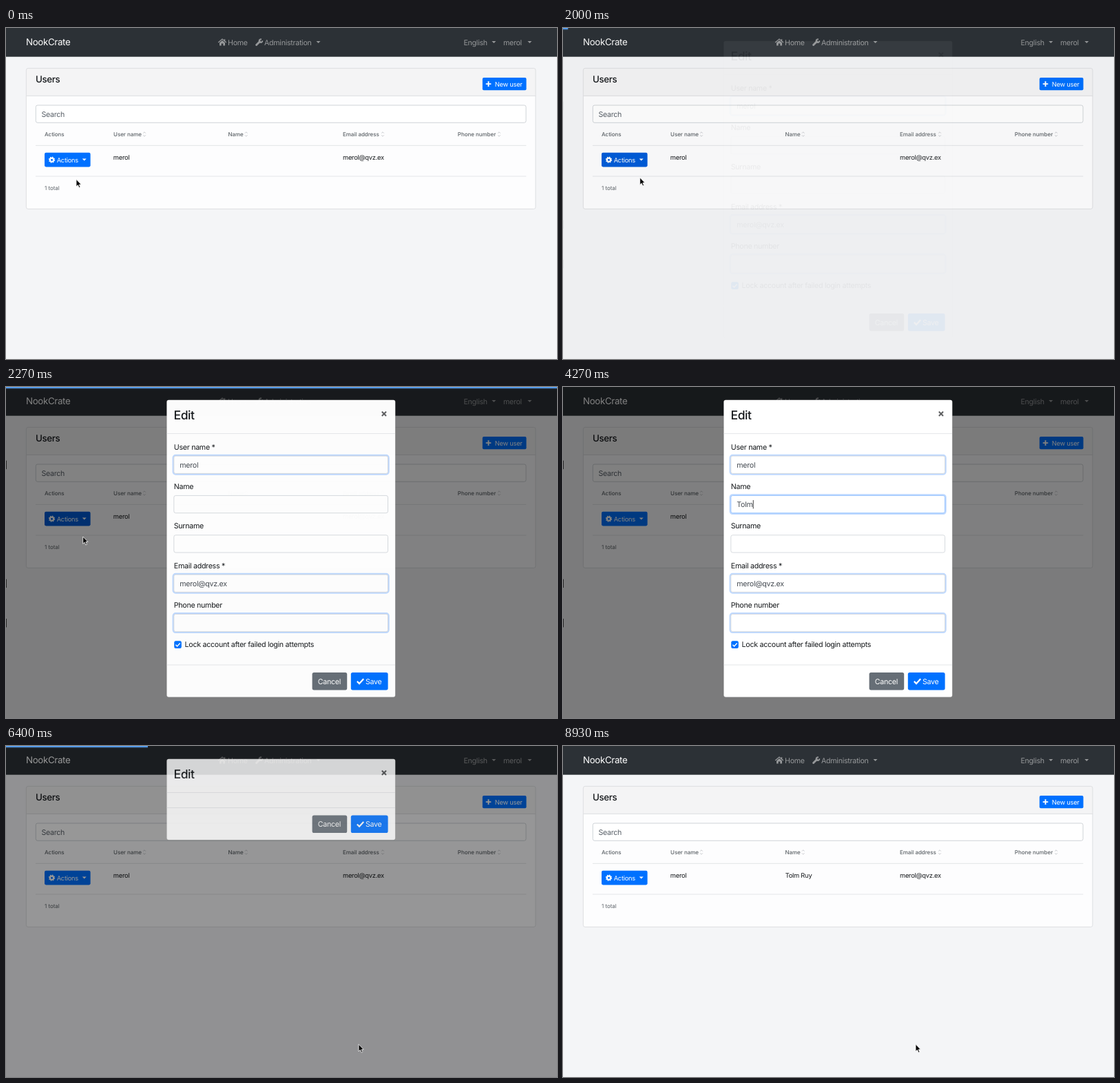
An HTML page that plays this animation: 800x480 px, repeating every 8.99 s.

```html
<!DOCTYPE html>
<html lang="en">
<head>
<meta charset="utf-8">
<title>Users</title>
<style>
  html, body { margin: 0; width: 100%; height: 100%; overflow: hidden; background: #f4f5f7; }
  svg { display: block; width: 100%; height: 100%; }
  text { font-family: Inter, "Liberation Sans", sans-serif; letter-spacing: -.027em; white-space: pre; text-rendering: geometricPrecision; }
  text.small { letter-spacing: -.005em; }
</style>
</head>
<body>
<svg id="stage" viewBox="0 0 800 480"></svg>
<script>
const LOOP = 8990;
const BLUE = '#0071ff', DARK_BLUE = '#005cd8', INK = '#15181b', MUTED = '#5d6368', NAV = '#96989a';
const USER = 'merol', MAIL = 'merol@qvz.ex', FIRST = 'Tolm', LAST = 'Ruy';
const BODY = 10.67, SMALL = 9.33, TINY = 8;

// Markup helpers
const text = (x, y, s, size = BODY, fill = INK, weight = 400, id = '') =>
  `<text ${id && `id="${id}"`} class="${size < 9 ? 'small' : ''}" x="${x}" y="${y}" font-size="${size}" fill="${fill}" font-weight="${weight}">${s}</text>`;
const rect = (x, y, w, h, fill, extra = '') =>
  `<rect x="${x}" y="${y}" width="${w}" height="${h}" fill="${fill}" ${extra}/>`;
const line = (x1, x2, y, color = '#dee0e3') =>
  `<path d="M${x1} ${y}H${x2}" stroke="${color}" stroke-width=".8"/>`;
const stroke = (d, color, width, extra = '') =>
  `<path d="${d}" fill="none" stroke="${color}" stroke-width="${width}" ${extra}/>`;
const caretDown = (x, y, fill) => `<path d="M${x} ${y}h6l-3 3z" fill="${fill}"/>`;
const sortMark = x => stroke(`M${x - 1.8} 152.6l1.8 -1.8l1.8 1.8M${x - 1.8} 155.4l1.8 1.8l1.8 -1.8`, '#b9bcc0', .8);
const tick = (x, y, size, width) =>
  stroke(`M${x} ${y}l${size * .34} ${size * .34}l${size * .66} ${-size * .72}`, '#fff', width);

const homeIcon = `<g fill="${NAV}">
  <path d="M310 21.6L314 18.1L318 21.6V25.6H315.3V22.6H312.7V25.6H310Z"/>
  <path d="M316.7 16.2h1.5v3h-1.5z"/></g>` + stroke('M308.2 21L314 16.1L319.8 21', NAV, 1.3);
const wrenchIcon = stroke('M363.6 24.5L368.6 19.5', NAV, 2.9, 'stroke-linecap="round"') +
  stroke('M370.9 16.6A2.3 2.3 0 1 0 372.2 18.4', NAV, 2);
const gearIcon = `<g fill="none" stroke="#fff"><circle cx="66.5" cy="191.2" r="2.6" stroke-width="2.1"/>
  <circle cx="66.5" cy="191.2" r="4" stroke-width="1.3" stroke-dasharray="1.57"/></g>`;

const navbar = rect(0, 0, 800, 41.7, '#2c3136') +
  text(29, 25.4, 'NookCrate', 13.33, '#fff') +
  homeIcon + text(322, 24.7, 'Home', BODY, NAV) +
  wrenchIcon + text(375, 24.7, 'Administration', BODY, NAV) + caretDown(450.5, 19, NAV) +
  text(664.5, 24.7, 'English', BODY, NAV) + caretDown(705.3, 19, NAV) +
  text(722, 24.7, USER, BODY, NAV) + caretDown(757.3, 19, NAV);

const columns = [[56, 'Actions'], [156, 'User name', 201], [322.5, 'Name', 348.7],
  [489, 'Email address', 547], [655.8, 'Phone number', 716]];

const card = rect(29.4, 58.4, 739.5, 204, '#fdfdfe', 'rx="2.6"') +
  rect(29.4, 58.4, 739.5, 40, '#f4f4f5', 'rx="2.6"') +
  line(29.4, 769, 98.4, '#d9dadc') +
  rect(29.4, 58.4, 739.5, 204, 'none', 'rx="2.6" stroke="#d9dadc" stroke-width=".8"') +
  text(43, 79.3, 'Users', 13.33, INK, 500) +
  rect(691.8, 72, 63.7, 18.2, BLUE, 'rx="2"') +
  stroke('M696.7 81.1h7.6M700.5 77.3v7.6', '#fff', 1.9) +
  text(709.7, 84.6, 'New user', SMALL, '#fff') +
  rect(43.3, 112, 711.7, 25.3, '#fff', 'rx="2.6" stroke="#c4c9ce" stroke-width=".8"') +
  text(51.5, 128.7, 'Search', BODY, '#596068') +
  columns.map(([x, name, mark]) => text(x, 157, name, TINY, MUTED, 500) + (mark ? sortMark(mark) : '')).join('') +
  line(43, 755.3, 170.4) + line(43, 755.3, 215) +
  rect(56, 180.8, 66.6, 20.6, BLUE, 'rx="2.1" id="actions"') + gearIcon +
  text(73.7, 194.7, 'Actions', SMALL, '#fff') + caretDown(110.7, 189.6, '#fff') +
  text(155.8, 191.4, USER, SMALL) + text(322.7, 191.4, '', SMALL, INK, 400, 'fullName') +
  text(489, 191.4, MAIL, SMALL) +
  text(56, 234.7, '1 total', TINY, MUTED);

const menu = `<g id="menu">` +
  rect(56.3, 203.4, 106.4, 75.4, '#fff', 'rx="2.6" stroke="#d5d6d8" stroke-width=".7"') +
  rect(56.7, 209, 105.6, 21.3, '#f1f3f5', 'id="menuHover"') +
  ['Edit', 'Permissions', 'Delete'].map((s, i) => text(73, 223.4 + i * 21.33, s)).join('') + `</g>`;

const field = (label, value, i) => {
  const y = 100.1 + i * 57.33;
  return text(243.8, y - 9.4, label) +
    rect(242.6, y - 1.2, 313, 27.7, 'none', `rx="3.6" stroke="#bfd9ff" stroke-width="2.2" id="ring${i}"`) +
    rect(243.8, y, 310.7, 25.3, '#fff', `rx="2.6" stroke="#cdd2d7" stroke-width=".8" id="input${i}"`) +
    text(252.3, y + 16.6, value, BODY, '#454b52', 400, 'value' + i) +
    rect(0, y + 6.6, .8, 12.4, '#111', `id="caret${i}"`);
};
const labels = [['User name *', USER], ['Name', ''], ['Surname', ''], ['Email address *', MAIL], ['Phone number', '']];

const modal = `<g id="modal">` +
  rect(233.3, 18.7, 332, 431, '#fff', 'rx="3" id="box" stroke="#000" stroke-opacity=".2" stroke-width=".6"') +
  text(243.6, 47.2, 'Edit', 17.5, INK, 500) +
  stroke('M545.8 35.8l6.2 6.2M552 35.8l-6.2 6.2', '#606163', 2) +
  line(233.6, 565, 67.6) +
  `<g id="form">` + labels.map(([l, v], i) => field(l, v, i)).join('') +
  rect(244.2, 368.3, 10.6, 10.6, BLUE, 'rx="2.2"') + tick(246.4, 373.8, 6.3, 1.4) +
  text(259.6, 377.4, 'Lock account after failed login attempts') + `</g>` +
  `<g id="foot">` + line(233.6, 565, 403) +
  rect(444.6, 414, 50.6, 25.4, '#666e76', 'rx="2.6"') + text(452.8, 430.6, 'Cancel', BODY, '#fff') +
  rect(500.8, 414, 53.8, 25.4, BLUE, 'rx="2.6" id="save"') + tick(509.8, 426.9, 9.4, 2.2) +
  text(522, 430.6, 'Save', BODY, '#fff') + `</g></g>`;

const pointer = `<g id="pointer"><path id="arrow" d="M0 0V10.4L2.4 8.2L4.1 12L5.8 11.2L4.2 7.6H7.3Z" fill="#000" stroke="#fff" stroke-width=".8"/>` +
  stroke('M-2 -5.5Q0 -5.5 0 -4Q0 -5.5 2 -5.5M0 -4V4M-2 5.5Q0 5.5 0 4Q0 5.5 2 5.5', '#222', .9, 'id="beam"') + `</g>`;

const stage = document.getElementById('stage');
stage.innerHTML = rect(0, 0, 800, 480, '#f4f5f7') + navbar + card + menu +
  rect(0, 0, 800, 480, '#000', 'id="shade"') + modal +
  `<g id="bar">` + rect(0, 0, 0, 3.2, '#5ca8ff', 'id="glow" opacity=".2"') + rect(0, 0, 0, 1.7, '#5ca8ff', 'id="fill"') + `</g>` + pointer;

const el = {};
stage.querySelectorAll('[id]').forEach(n => el[n.id] = n);
const set = (id, name, value) => el[id].setAttribute(name, value);
const show = (id, on) => set(id, 'visibility', on ? 'inherit' : 'hidden');

// Timing helpers
const clamp = v => Math.min(1, Math.max(0, v));
const smooth = v => v * v * (3 - 2 * v);
const between = (t, a, b) => t >= a && t < b;

// CSS "ease": cubic-bezier(.25, .1, .25, 1)
function ease(x) {
  x = clamp(x);
  let lo = 0, hi = 1, s = .5;
  for (let i = 0; i < 20; i++) {
    s = (lo + hi) / 2;
    const bx = .75 * s * (1 - s) * (1 - s) + .75 * s * s * (1 - s) + s * s * s;
    if (bx < x) lo = s; else hi = s;
  }
  return .3 * s * (1 - s) * (1 - s) + 3 * s * s * (1 - s) + s * s * s;
}

// Steps are [time, value, ...]; returns the values at t
function track(steps, t, curve = v => v) {
  const i = steps.findIndex(s => s[0] > t);
  if (i === 0) return steps[0].slice(1);
  if (i < 0) return steps[steps.length - 1].slice(1);
  const a = steps[i - 1], b = steps[i];
  const k = curve((t - a[0]) / (b[0] - a[0]));
  return a.slice(1).map((v, j) => v + (b[j + 1] - v) * k);
}

const OPEN = 1978, CLOSE = 6349, FADE = 350;
const path = [[730, 102, 219.5], [1000, 110, 193], [1190, 110, 193], [1400, 111.7, 217],
  [2600, 111.7, 217], [2930, 300, 171], [5270, 300, 171], [5950, 512, 432.5]];
const bars = [
  { width: [[1980, 0], [2000, 4], [2130, 430], [2200, 680], [2260, 800]], fade: 2670 },
  { width: [[6300, 0], [6350, 60], [6400, 201], [6465, 520], [6530, 772], [6600, 800]], fade: 6730 }
];
const typing = [
  { field: 1, word: FIRST, focus: 2970, blur: 4730, keys: [3730, 3870, 4070, 4200] },
  { field: 2, word: LAST, focus: 4730, blur: 6200, keys: [4930, 5070, 5200] }
];

function drawTyping(t) {
  for (const { field, word, focus, blur, keys } of typing) {
    const value = el['value' + field];
    const typed = word.slice(0, keys.filter(k => k <= t).length);
    if (value.textContent !== typed) value.textContent = typed;
    const ring = clamp((t - focus) / 150) * (1 - clamp((t - blur) / 150));
    set('ring' + field, 'opacity', ring);
    set('input' + field, 'stroke', ring > .5 ? '#80b6ff' : '#cdd2d7');
    const blink = (t - focus) % 1000;
    const on = between(t, focus, blur) ? 1 - clamp((blink - 490) / 70) : 0;
    set('caret' + field, 'opacity', on);
    set('caret' + field, 'x', 252.6 + (typed ? value.getComputedTextLength() : 0));
  }
}

function drawBar(t) {
  const { width, fade } = bars[t < 5000 ? 0 : 1];
  const [w] = track(width, t);
  set('fill', 'width', w);
  set('glow', 'width', w);
  set('bar', 'opacity', 1 - clamp((t - fade) / 400));
}

function draw(t) {
  const visible = ease((t - OPEN) / FADE) * (1 - ease((t - CLOSE) / FADE));
  set('shade', 'opacity', visible * .5);
  set('modal', 'opacity', visible);

  const closed = t >= CLOSE;
  show('form', !closed);
  set('box', 'height', closed ? 117.6 : 431);
  set('foot', 'transform', `translate(0 ${closed ? -313.4 : 0})`);

  const [x, y] = track(path, t, smooth);
  const overField = between(t, 2880, 5400);
  set('pointer', 'transform', `translate(${x} ${y})`);
  show('pointer', !between(t, 3730, 5270));
  show('arrow', !overField);
  show('beam', overField);

  show('menu', between(t, 1130, 1570));
  show('menuHover', between(t, 1130, 1570) && y > 209);
  set('actions', 'fill', between(t, 940, 2970) ? DARK_BLUE : BLUE);
  set('save', 'fill', between(t, 5880, CLOSE) ? DARK_BLUE : BLUE);
  el.fullName.textContent = t >= 6670 ? `${FIRST} ${LAST}` : '';

  drawTyping(t);
  drawBar(t);
}

const start = performance.now();
function frame() {
  draw((performance.now() - start) % LOOP);
  requestAnimationFrame(frame);
}
frame();
</script>
</body>
</html>
```
